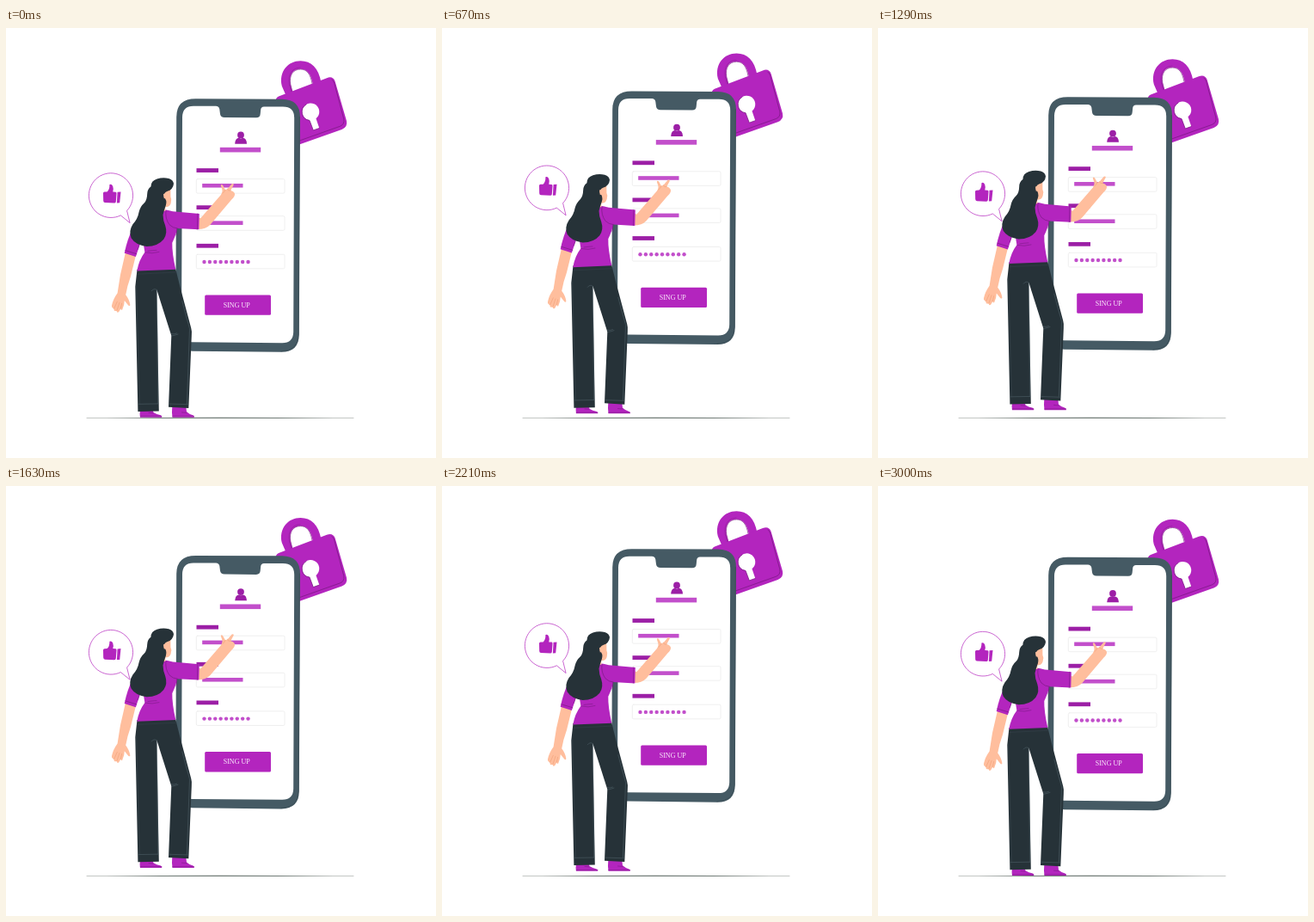
These frames come from a looping animation (500x500 px, 3040 ms). An HTML page with a canvas:

```html
<!DOCTYPE html>
<html lang="en">
<head>
<meta charset="utf-8">
<title>Sign up</title>
<style>
  html, body { margin: 0; width: 100%; height: 100%; overflow: hidden; background: #fff; }
  canvas { display: block; width: 500px; height: 500px; }
</style>
</head>
<body>
<canvas id="stage"></canvas>
<script>
const canvas = document.getElementById('stage');
const ctx = canvas.getContext('2d');
const dpr = window.devicePixelRatio || 1;
canvas.width = canvas.height = Math.round(500 * dpr);

const LOOP = 3040, FPS = 24, STEPS = 73, LIFT = 10;
const C = {
  main: '#b325be', deep: '#9c1fa6', soft: '#c24fcb', line: '#7d1a86',
  slate: '#455a64', dark: '#263238', seam: '#55666e', skin: '#ffbe9d',
  fold: '#eb996e', pale: '#ebebeb', white: '#fff'
};

function fill(d, color) {
  ctx.fillStyle = color;
  ctx.fill(new Path2D(d));
}

function stroke(d, color, width = 0.7) {
  ctx.strokeStyle = color;
  ctx.lineWidth = width;
  ctx.lineCap = ctx.lineJoin = 'round';
  ctx.stroke(new Path2D(d));
}

function rect(x, y, w, h, color) {
  ctx.fillStyle = color;
  ctx.fillRect(x, y, w, h);
}

function round(x, y, w, h, r, color, outline) {
  ctx.beginPath();
  ctx.roundRect(x, y, w, h, r);
  if (outline) {
    ctx.strokeStyle = color;
    ctx.lineWidth = 0.8;
    ctx.stroke();
  } else {
    ctx.fillStyle = color;
    ctx.fill();
  }
}

function dot(x, y, r, color) {
  ctx.beginPath();
  ctx.arc(x, y, r, 0, Math.PI * 2);
  ctx.fillStyle = color;
  ctx.fill();
}

function ground() {
  stroke('M94 453.5H404', '#a9aeab', 0.7);
  fill('M116 453.4Q248 452.2 381 453.4Q248 454.8 116 453.4Z', '#6f7a75');
}

function lock() {
  // shackle
  fill('M326 80L320.8 68C317 51 328 38.8 342.5 38.8C355 38.8 363.5 47 366.5 64L357 67C355 54 350 48.3 342.5 48.3C333 48.3 328.5 56 331 67L334 77Z', C.main);
  stroke('M333 75L330.8 66C329 55 334 48.6 342.5 48.5C350 48.6 354 54 356 65', C.line, 0.7);
  stroke('M331.5 75L329.3 66C327.5 54 333 47 342 46.5', C.line, 0.4);
  // body
  fill('M317 80L373 58.7Q380 56 382.6 62.5L396 108.5Q397.6 115.5 390.5 118.5L341 136L326 138L314 88Q312.5 82 317 80Z', C.main);
  stroke('M379 60.5Q381 62 381.8 65L392.8 106.5Q394 112.5 388.5 114.8L340 132', C.line, 0.8);
  // keyhole
  fill('M344.3 98.5A10 10 0 1 1 360.5 105.8L364.3 117L357.3 119.5L353 108A10 10 0 0 1 344.3 98.5Z', C.white);
  stroke('M349 89.5A10 10 0 0 0 353 108L357.3 119.5L364.3 117', C.line, 0.8);
}

function field(y) {
  rect(221.5, y, 25.5, 4.8, C.deep);
  round(221.3, y + 12.4, 102.7, 16.6, 1.5, C.pale, true);
}

function phone() {
  fill('M220.5 82.8L321 83.2Q342.2 83.4 342 104.5L340.8 357Q340.6 377.4 320 377.3L217 376.2Q197 376 197.3 355L198.2 104Q198.3 82.8 220.5 82.8Z', C.slate);
  stroke('M341.2 104L340 357Q339.8 376.4 320 376.4', '#3a4d56', 0.8);
  fill('M218 91.4H244Q247.6 91.4 248.3 95L249 100.5Q249.6 104.4 254 104.5L291 104.8Q295.4 104.8 295.7 100.5L296.2 95.5Q296.5 92 300 92H322Q335.2 92 335.2 105L334.2 354Q334 366.8 321 366.7L216 365.8Q203.8 365.6 204 352L205 104.5Q205.2 91.4 218 91.4Z', C.white);

  dot(273, 125, 3.9, C.deep);
  fill('M266.2 135.2Q266.6 128.6 271 128.4Q273 129.8 275.2 128.4Q279.7 128.6 280 135.2Z', C.deep);
  rect(248.8, 139.4, 47.4, 5.6, C.soft);

  [163.7, 206.8, 251.4].forEach(field);
  rect(228.2, 181.5, 47.3, 4.6, C.soft);
  rect(228.2, 224.9, 47.3, 4.6, C.soft);
  for (let i = 0; i < 9; i++) dot(230.5 + i * 6.38, 272.5, 2.2, C.soft);

  round(231.2, 311, 76.8, 23.3, 1.5, C.main);
  ctx.fillStyle = '#fbeefc';
  ctx.font = '8px "Liberation Serif", "Times New Roman", serif';
  ctx.textAlign = 'center';
  ctx.fillText('SING UP', 268.2, 325.2);
}

function bubble() {
  stroke('M133 218.6A25.6 25.9 0 1 1 140.6 213L144 226.8Z', C.main, 0.7);
  fill('M113 192.6Q113 191.2 114.5 191.1L117.5 191Q120.6 188.5 120.4 182.6Q122.8 181.5 124.2 184.5Q125.4 187.5 124.3 191L127.6 191.2Q128.6 191.3 128.5 193L127.8 202.5Q127.6 204 126 204.1L115 203.6Q113.3 203.3 113.2 201.5Z', C.main);
  fill('M129.6 191.3L133.5 191L132.2 203.8L128.9 204Z', C.main);
}

function shoes() {
  fill('M156 444H170.5L171.5 447.3Q175 449.5 180 450.6Q181.6 451.3 181.2 453H156Q155.2 449 156 444Z', C.main);
  fill('M193.3 440H209.3L210 446.5Q213 449.3 217.5 450.6Q219.3 451.3 218.8 453H193.5Q192.6 447 193.3 440Z', C.main);
  stroke('M156.2 451.8H181M193.6 451.8H218.6', C.line, 0.6);
  stroke('M166 447.6L171 448M204.5 447.2L210 447.6', C.line, 0.6);
}

function trousers() {
  fill('M152.5 281L197 279.5Q200.5 294 204.5 309L215.2 349Q216.3 352.5 215.8 358L212.3 442.3L189 441L192.3 358L175.3 304.5L177.8 445.8L153.4 446.3L150.3 301Z', C.dark);
  stroke('M154 437.6L177 437.2M189.6 437.3L212 438', C.seam, 0.5);
  stroke('M169.3 306Q172 302.5 175.3 304.8L176.8 437M204.8 318L213.5 350L210.4 437', C.seam, 0.5);
  stroke('M192.5 358.3Q196 357.8 200 356.3M192.4 356Q196 356.6 198.5 355.3', C.seam, 0.5);
  stroke('M151.6 300L155.3 437M152.5 286.5L198 284.3', '#36454c', 0.5);
}

function loweredArm() {
  fill('M139 261L151 264.5L145 289Q141 300 139.2 310.5Q143.5 316 144.4 322.5Q143.2 324.5 141.6 322L137.8 317.2Q137.8 322 135.2 327.8Q133.6 329 133.4 326.5L131.3 330.3Q129.3 332 128.8 329.4L127.3 329.2Q125.4 330 125.5 327L124 325.8Q122.5 325 123 322.8Q124.5 315.5 129.6 308.5L133 287Z', C.skin);
  stroke('M129.3 318.5L125.7 326.5M132 319.5L129 328.5M134.6 320.5L133.4 326.5', C.fold, 0.5);
}

function raisedArm() {
  fill('M222 219.5L226.2 221.5L249.7 194.5Q252.3 190.5 251.2 187.6L249.8 183.5Q250.3 181.5 252 183L255 188.4L257.7 187.2L262.6 181.5Q264.7 180.6 264.8 182.6L261.2 189.2Q264.5 189.8 265.8 192.3Q267 195.5 262.3 199.8L237.5 229Q232.5 234.4 222 234.2Z', C.skin);
  stroke('M257.7 187.2Q257.5 190 261.2 189.2M252 192.5Q254.2 191 255 188.4', C.fold, 0.5);
}

function shirt() {
  fill('M147 234L157.5 246L150.9 266.2L137.7 262Q141 246 147 234Z', C.main);
  stroke('M138.9 259L151.8 263', C.line, 0.7);
  stroke('M155.8 248Q155.5 253 153.2 258', C.line, 0.6);
  fill('M181 211.5Q188 211.5 194 213.5L224.8 216.2L224.3 234.6L199 233.2Q198 240 193.3 250Q193 262 197.3 281L152.3 282.8Q154.5 270 161.4 261L158 240Z', C.main);
  stroke('M186 212.5Q184.8 222 190 229Q194 233 199.3 233.3', C.line, 0.7);
  stroke('M222.8 216.2L222.4 234.3', C.line, 0.6);
  stroke('M198.8 233.5L198.2 241', C.line, 0.7);
  stroke('M162 261.2Q170 263.2 178 260.7M165 259.6Q170 258.9 175 258.6', C.line, 0.6);
}

function head() {
  fill('M180 187L191.3 186.5L191.4 196.5Q192.8 200 192 201.5Q191.8 207.2 187.5 208.2L185.3 208.5V213H179Z', C.skin);
  fill('M195 181.3Q194.4 188.2 187.2 190.3Q183.2 192 183.6 196.5Q187.5 200.5 186 206Q183.6 212.5 182.5 217.5Q182.6 224 185.2 230Q188.2 239 183.3 246Q176.5 254.3 163.5 254.2Q150.5 252.5 145.6 244.5Q142.3 236.5 147.4 228.5Q153.3 222 154.5 214.5Q156 208 160.7 203.8Q164 200.5 164.2 193Q164.4 187.5 168.4 184.8Q168.5 178 175.5 175.8Q182.5 173.6 189.3 175.3Q194.4 176.8 195 181.3Z', C.dark);
  fill('M183 193.2Q186.8 191.6 187.5 194.8Q187.4 198.4 183.8 198.6Z', C.skin);
}

function woman() {
  loweredArm();
  shoes();
  trousers();
  raisedArm();
  shirt();
  head();
}

// Straight up and straight back down.
function lift(p) {
  const u = p % 1;
  return -LIFT * (1 - Math.abs(1 - 2 * u));
}

function shifted(dy, ...parts) {
  ctx.save();
  ctx.translate(0, dy);
  parts.forEach(part => part());
  ctx.restore();
}

function draw(ms) {
  const step = Math.floor((ms % LOOP + 5) * FPS / 1000) % STEPS;
  const p = (step + 1) / STEPS;
  ctx.setTransform(dpr, 0, 0, dpr, 0, 0);
  rect(0, 0, 500, 500, C.white);
  ground();
  shifted(lift(p * 2), lock, phone, bubble);
  shifted(lift(p), woman);
}

const start = performance.now();
function tick(now) {
  draw(Math.max(0, now - start));
  requestAnimationFrame(tick);
}
draw(0);
requestAnimationFrame(tick);
</script>
</body>
</html>
```
